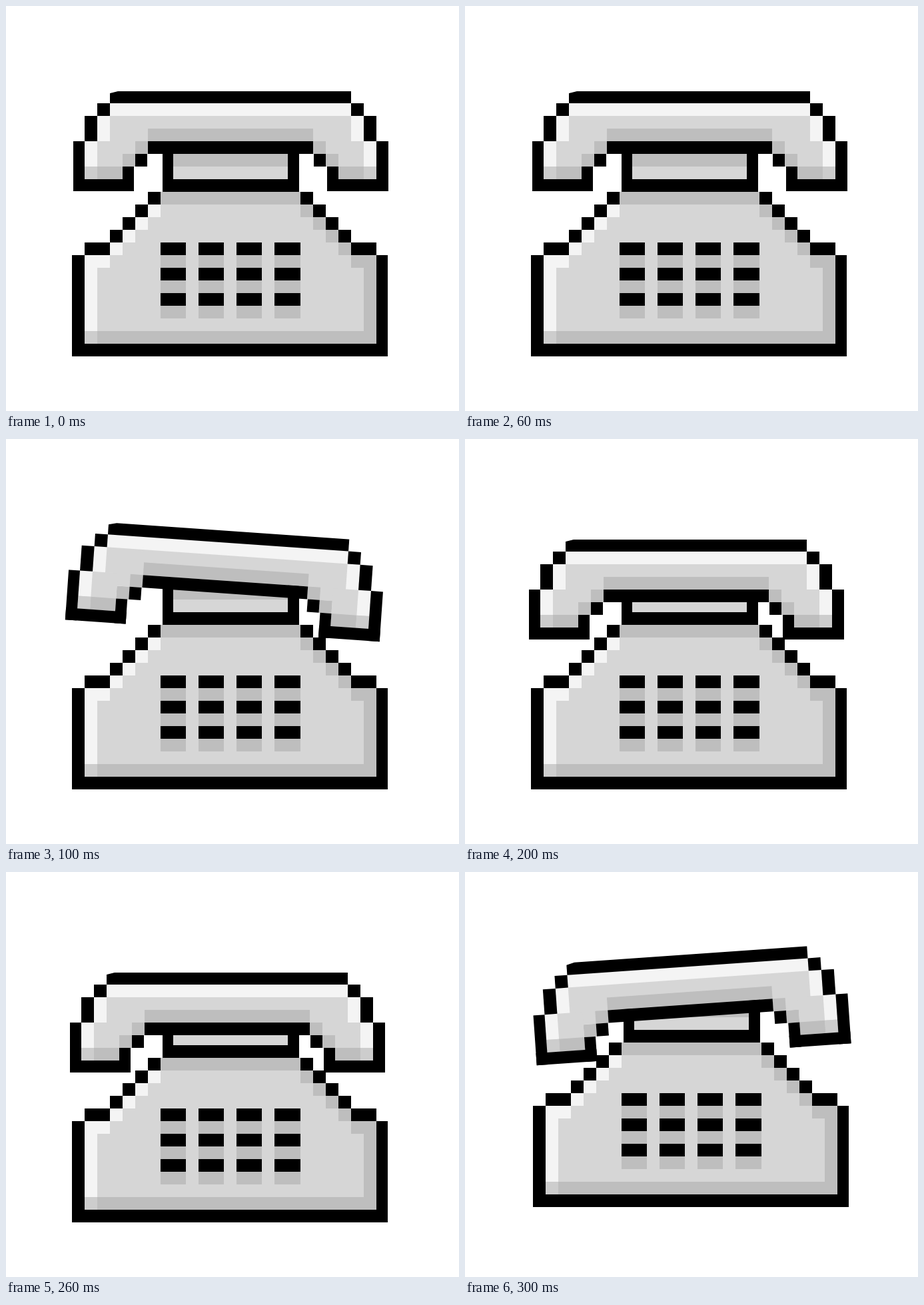
These frames come from a looping animation (680 by 608 pixels, 0.4 s). An HTML page with a canvas:

```html
<!DOCTYPE html>
<html lang="en">
<head>
<meta charset="utf-8">
<title>Ringing telephone</title>
<style>
  html, body { margin: 0; width: 100%; height: 100%; overflow: hidden; background: #fff; }
  canvas { display: block; }
</style>
</head>
<body>
<canvas id="stage" width="680" height="608"></canvas>
<script>
const ctx = document.getElementById('stage').getContext('2d');
const LIGHT = '#f4f4f4', MID = '#d6d6d6', DARK = '#bebebe', CORNER = '#cdcdcd', BLACK = '#000';

// The phone is pixel art on a grid of 25 columns and 21 rows.
const COLUMNS = 25, CELL = 19.03;
const gridX = col => Math.round(99 + col * CELL);
const gridY = row => Math.round(126.7 + row * CELL);

function block(color, col, row, cols = 1, rows = 1) {
  const x = gridX(col), y = gridY(row);
  ctx.fillStyle = color;
  ctx.fillRect(x, y, gridX(col + cols) - x, gridY(row + rows) - y);
}

function mirrored(color, col, row, cols = 1, rows = 1) {
  block(color, col, row, cols, rows);
  block(color, COLUMNS - col - cols, row, cols, rows);
}

function clipTo(points) {
  ctx.beginPath();
  for (const [x, y] of points) ctx.lineTo(x, y);
  ctx.clip();
}

function drawNeck() {
  block(BLACK, 7.15, 4.5, 10.75, 3.5);
  block(DARK, 8, 4.5, 9, 1.5);
  block(MID, 8, 6, 9);
}

function drawShoulders() {
  block(DARK, 7, 8, 11);
  for (let step = 0; step < 5; step++) {
    const row = 8 + step;
    if (step > 0) {
      block(MID, 8 - step, row, 9 + 2 * step);
      block(LIGHT, 7 - step, row);
      block(DARK, 17 + step, row);
    }
    if (step < 4) mirrored(BLACK, 6 - step, row);
  }
  mirrored(BLACK, 1, 12, 2);
}

function drawBox() {
  block(MID, 1, 13, 23, 7);
  block(LIGHT, 1, 13, 2);
  block(LIGHT, 1, 13, 1, 6);
  block(DARK, 22, 13, 2);
  block(DARK, 23, 13, 1, 7);
  block(DARK, 2, 19, 22);
  block(CORNER, 1, 19);
  mirrored(BLACK, 0, 13, 1, 8);
  block(BLACK, 0, 20, COLUMNS);
}

function drawKeys() {
  for (let row = 12; row < 18; row += 2) {
    for (let col = 7; col < 18; col += 3) {
      block(BLACK, col, row, 2);
      block(DARK, col, row + 1, 2);
    }
  }
}

function drawBase() {
  clipTo([[99, 203], [573, 203], [573, 526], [99, 526]]);
  drawNeck();
  drawShoulders();
  drawBox();
  drawKeys();
}

function drawHandset() {
  // The clip also cuts the top left corner.
  clipTo([[101, 131], [156, 131], [168, 128], [574, 128], [574, 278], [101, 278]]);

  block(MID, 3, 1, 19, 3);
  mirrored(MID, 2, 2, 4, 3);
  mirrored(MID, 1, 4, 3, 3);

  block(LIGHT, 3, 1, 19);
  mirrored(LIGHT, 2, 2, 1, 2);
  mirrored(LIGHT, 1, 4, 1, 2);

  block(DARK, 6, 3, 13);
  mirrored(DARK, 5, 4);
  mirrored(DARK, 4, 5);
  mirrored(DARK, 2, 6, 2);
  mirrored(CORNER, 1, 6);

  block(BLACK, 3, 0, 19);
  block(BLACK, 6, 4, 13);
  mirrored(BLACK, 2, 1);
  mirrored(BLACK, 1, 2, 1, 2);
  mirrored(BLACK, 0, 4, 1, 4);
  mirrored(BLACK, 0, 7, 4.9);
  mirrored(BLACK, 4, 6, 0.9, 2);
  mirrored(BLACK, 5, 5, 0.92);
}

const STEP = 100;
const POSES = [
  { base: [0, 0], handset: [0, 0], tilt: 0 },
  { base: [0, 0], handset: [7.5, -13.2], tilt: 4 },
  { base: [0, 0], handset: [-5, 23], tilt: 0 },
  { base: [3, -23], handset: [-12.4, 19.9], tilt: -4 }
];

function place([x, y], degrees, draw) {
  ctx.save();
  ctx.translate(x, y);
  ctx.rotate(degrees * Math.PI / 180);
  draw();
  ctx.restore();
}

function tick() {
  const pose = POSES[Math.floor(performance.now() / STEP) % POSES.length];
  ctx.clearRect(0, 0, 680, 608);
  place(pose.base, 0, drawBase);
  place(pose.handset, pose.tilt, drawHandset);
  requestAnimationFrame(tick);
}
tick();
</script>
</body>
</html>
```
